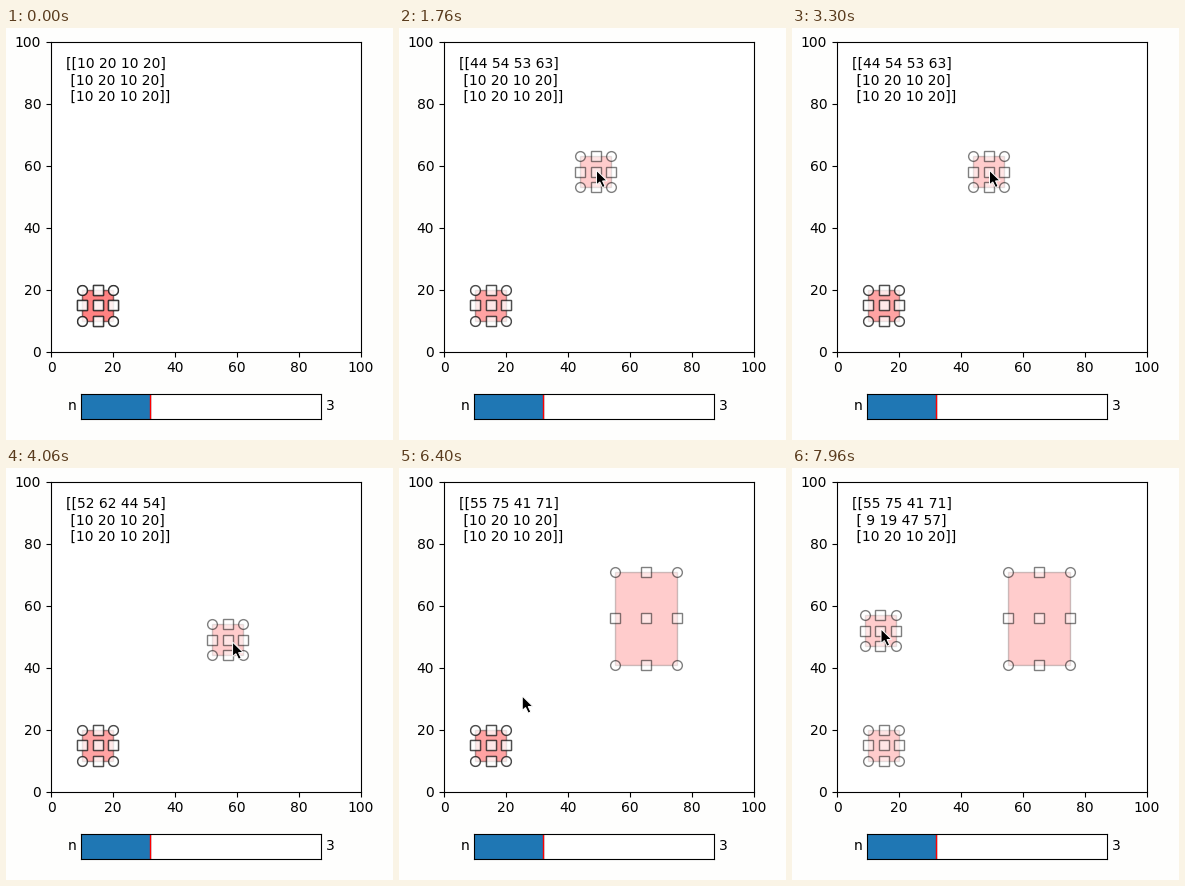
Animation of 387 by 412 pixels, one loop 8 s. Source, as a matplotlib script:

```python
import numpy as np
import matplotlib.pyplot as plt
from matplotlib.animation import FuncAnimation
from matplotlib.patches import Polygon, Rectangle

W, H, DPI = 387, 412, 100
FRAMES, STEP = 250, 32  # 8000 ms loop
LEFT, BOTTOM, SIDE = 45, 88.3, 310  # plot area in pixels
CURSOR_IN = 30
LAG = 60  # ms by which a dragged box trails the pointer

plt.rcParams.update({"font.family": "DejaVu Sans", "font.size": 10, "toolbar": "None"})


def glide(t, origin, moves):
    """Position after eased moves of (start, end, goal), with an optional upward bend."""
    pos = last = np.array(origin, float)
    for start, end, goal, *bend in moves:
        s = np.clip((t - start) / (end - start), 0, 1)
        f = s * s * (3 - 2 * s)
        pos = pos + (np.array(goal) - last) * f + [0, sum(bend) * np.sin(np.pi * f)]
        last = np.array(goal, float)
    return pos


# Box corners in data units and the times of each drag
HOME, UP, DOWN, TOP_RIGHT, ASIDE = (10, 10), (44, 53), (55, 41), (75, 71), (9, 47)
LIFT, LOWER, STRETCH, CARRY = (1070, 1700), (3570, 4180), (4930, 5490), (6640, 7870)


def grip(corner, reach=5):
    """Where the pointer holds a box: its centre, or its far corner with reach 10."""
    return corner[0] + reach + 0.2, corner[1] + reach + 0.5


POINTER_MOVES = [
    (30, 430, (25, 16.7)),
    (660, 960, grip(HOME)),
    (*LIFT, grip(UP)),
    (2060, 2600, (5.8, 99.3)),
    (2610, 2860, (23.2, 95)),
    (2900, 3300, grip(UP)),
    (*LOWER, grip(DOWN)),
    (4290, 4800, grip(DOWN, 10)),
    (*STRETCH, grip(TOP_RIGHT, 0)),
    (5830, 6600, grip(HOME), 12),
    (*CARRY, grip(ASIDE)),
]


def boxes_at(t):
    """Lower left corner and size of each box, on whole units."""
    t -= LAG
    small = np.array([10, 10])
    full = np.subtract(TOP_RIGHT, DOWN)
    first = glide(t, HOME, [(*LIFT, UP), (*LOWER, DOWN)])
    size = glide(t, small, [(*STRETCH, full)])
    second = glide(t, HOME, [(*CARRY, ASIDE)])
    pairs = [(first, size), (second, small), (HOME, small)]
    return [np.round(pair).astype(int) for pair in pairs]


def pixel_axes(x, y, w, h):
    return fig.add_axes([x / W, y / H, w / W, h / H])


class Selector:
    def __init__(self, ax):
        self.rect = ax.add_patch(Rectangle((0, 0), 1, 1, facecolor="red",
                                           edgecolor="black", alpha=0.2))
        self.corners, self.squares = (
            ax.plot([], [], ls="none", marker=shape, ms=7, mfc="white",
                    mec="black", alpha=0.5)[0] for shape in "os")

    def place(self, low, size):
        (x0, y0), (x1, y1) = low, low + size
        xm, ym = (x0 + x1) / 2, (y0 + y1) / 2
        self.rect.set_bounds(x0, y0, *size)
        self.corners.set_data([x0, x1, x1, x0], [y0, y0, y1, y1])
        self.squares.set_data([x0, xm, x1, xm, xm], [ym, y0, ym, y1, ym])


fig = plt.figure(figsize=(W / DPI, H / DPI), dpi=DPI, facecolor="#fefefd")

ax = pixel_axes(LEFT, BOTTOM, SIDE, SIDE)
ax.set(xlim=(0, 100), ylim=(0, 100),
       xticks=range(0, 101, 20), yticks=range(0, 101, 20))
selectors = [Selector(ax) for _ in range(3)]
readout = ax.text(5, 95, "", va="top")

slider = pixel_axes(75, 21.2, 240, 25.2)
slider.set(xlim=(0, 1), ylim=(0, 1), xticks=[], yticks=[])
slider.axvspan(0, 2 / 7, color="#1f77b4")
slider.axvline(2 / 7, color="red", lw=1)
slider.text(-0.02, 0.5, "n", ha="right", va="center")
slider.text(1.02, 0.5, "3", ha="left", va="center")

ARROW = np.array([(0, 0), (0, -14.5), (3.3, -11.6), (6, -17.2), (8.6, -16),
                  (6, -10.6), (10.6, -10.4)])
arrow = Polygon(ARROW, facecolor="black", edgecolor="white", lw=0.7,
                transform=None, zorder=10)
fig.add_artist(arrow)


def draw(i):
    t = i * STEP
    boxes = boxes_at(t)
    for sel, (low, size) in zip(selectors, boxes):
        sel.place(low, size)
    readout.set_text(str(np.array([[x, x + w, y, y + h] for (x, y), (w, h) in boxes])))

    tip = glide(t, (103, 21.2), POINTER_MOVES) * SIDE / 100 + [LEFT, BOTTOM]
    arrow.set_xy(tip + ARROW)
    arrow.set_visible(t >= CURSOR_IN)
    return []


anim = FuncAnimation(fig, draw, frames=FRAMES, interval=STEP, repeat=True, repeat_delay=0)
plt.show()
```
